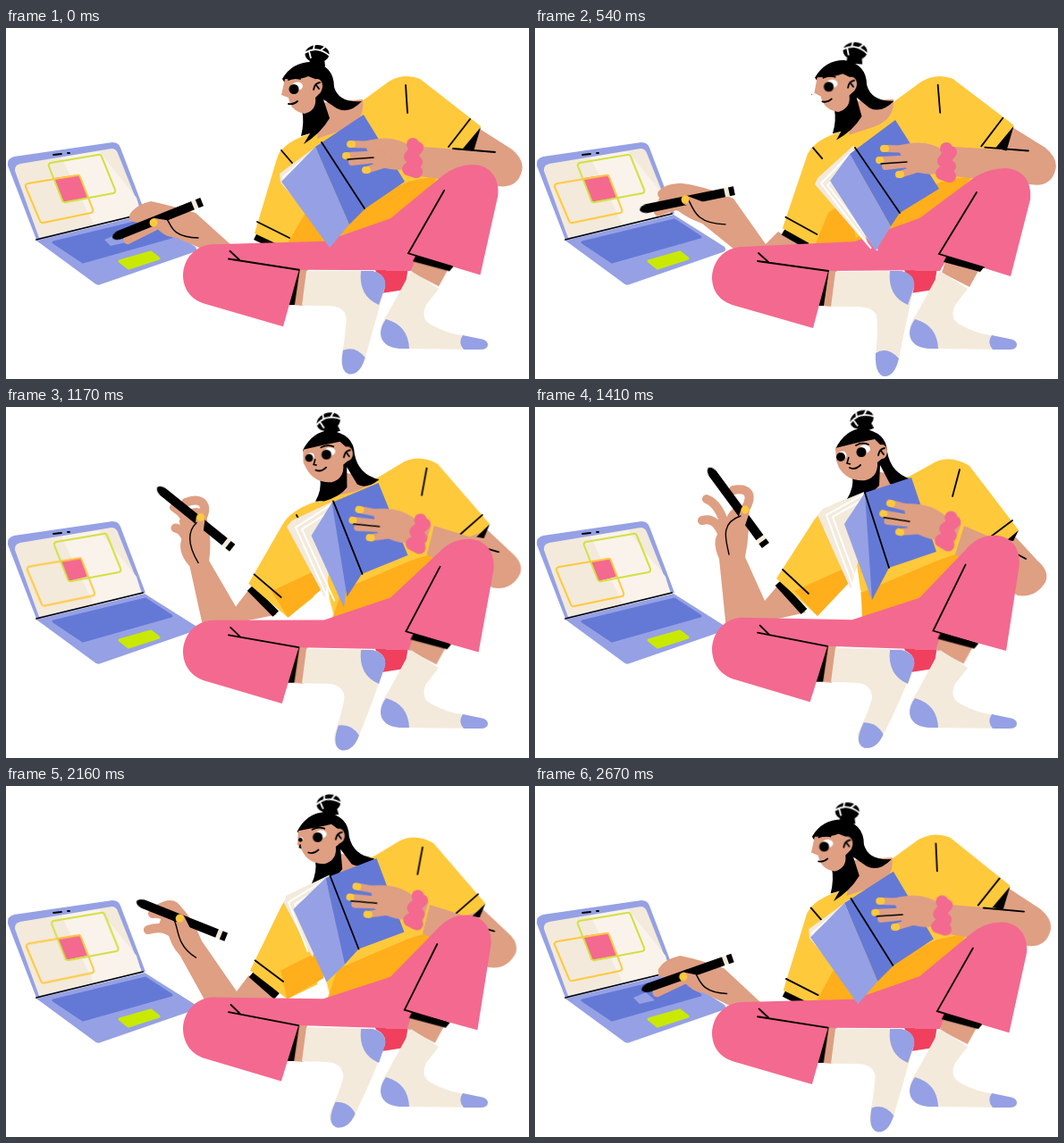
Animation of 585 by 393 pixels, one loop 2700 ms. Source, as an HTML page without scripts:

```html
<!DOCTYPE html>
<html lang="en">
<head>
<meta charset="utf-8">
<title>Sketching at the laptop</title>
<style>
html,body{margin:0;width:100%;height:100%;overflow:hidden;background:#fff}
svg{display:block;width:100%;height:100%}
path{fill:none}
.skin{fill:#de9f83}.yellow{fill:#ffc93c}.amber{fill:#ffae1c}.pink{fill:#f4698f}.red{fill:#f0405e}
.cream{fill:#f3eadb}.glare{fill:#f9f3ec}.lime{fill:#c9e900}.blue{fill:#95a1e4}.deep{fill:#6479d6}.black{fill:#000}
.line{stroke:#000;stroke-width:1.8;stroke-linecap:round}
.thin{stroke-width:1.4}
.finger{stroke:#de9f83;stroke-width:10;stroke-linecap:round;stroke-linejoin:round}
.dots{stroke:#ffc93c;stroke-width:8;stroke-linecap:round}
.leaf{stroke:#fff;stroke-width:2}

/* shared rhythms: legs sway, torso leans, head turns, pose runs key to key */
.sway,.lean,.turn,.late,.pose{animation-duration:2.7s;animation-iteration-count:infinite}
.sway{animation-timing-function:linear(.25,0 20%,.31 34.4%,.83 52.2%,1 70%,.56 90%,.24)}
.lean{animation-timing-function:linear(0,-.05 20%,.5 34.4%,1 52.2%,1.03 70%,.5 90%,0)}
.turn{animation-timing-function:linear(0,.15 20%,.69 34.4%,1 52.2%,.93 70%,.31 90%,0)}
.late{animation-timing-function:linear(0,0 20%,.75 34.4%,1 52.2%,.95 70%,0 90%,0)}
.pose{animation-timing-function:linear}

/* screen */
@keyframes frameA{to{transform:translate(2px,5px)}}
@keyframes frameB{to{transform:translate(7px,0)}}
@keyframes overlap{from{d:path("M54 168L82 164L91 190L63 195Z")}to{d:path("M62 173L84 169L91 190L71 195Z")}}
@keyframes touch{0%,4%,98%,100%{opacity:1}9%,95%{opacity:0}}

/* legs */
@keyframes legs{
from{d:path("M231 245L358 239L430 213L492 167Q508 157 526 157C548 158 556 175 554 192L532 278L452 253L452 271L328 272L311 336L224 311C206 306 198 294 198 279C199 260 212 246 231 245Z")}
to{d:path("M231 234L354 238L430 214L478 160Q492 141 511 141C531 141 541 157 539 175L526 272L444 250L443 272L327 267L307 329L224 304C206 299 198 284 198 269C199 250 212 235 231 234Z")}}
@keyframes creases{
from{d:path("M249 261L328 272M250 252L261 262M494 184L452 253L502 268")}
to{d:path("M249 251L327 267M252 243L262 253M479 175L444 250L490 264")}}
@keyframes sock{
from{d:path("M336 273L410 272Q425 276 424 290Q415 330 407 370Q402 391 390 390Q381 387 381 372Q384 335 382 322Q378 312 360 312L331 312Z")}
to{d:path("M336 269L410 271Q426 276 424 289Q405 335 386 366Q378 382 364 380Q355 377 357 364Q372 340 376 326Q376 309 358 308L331 307Z")}}
@keyframes toe{
from{d:path("M381 364Q394 356 407 370Q402 391 390 390Q380 387 381 364Z")}
to{d:path("M365 351Q381 353 386 366Q378 382 364 380Q351 375 365 351Z")}}
@keyframes ankleL{to{transform:translate(-1px,-4px)}}
@keyframes ankleR{to{transform:translate(-8px,-3px)}}

/* torso */
@keyframes nudge{0%,52.2%,100%{transform:none}20%,34.4%{transform:translate(5px,0)}70%{transform:translate(-3px,0)}90%{transform:translate(-2px,0)}}
@keyframes shirt{
from{d:path("M340 118L398 82L428 60Q445 50 463 57L531 110L519 134L494 180L440 226L365 246L345 244Z")}
to{d:path("M350 103L420 77L447 62Q465 53 486 66L541 138L530 150L494 178L440 226L368 244L364 205Z")}}
@keyframes hem{from{d:path("M345 244L400 195L450 172L484 165L440 226L365 246Z")}to{d:path("M366 240L365 208L450 172L484 160L440 226L368 244Z")}}
@keyframes seams{from{d:path("M447 64L449 95M519 102L495 133")}to{d:path("M475 70L467 100M534 127L510 145")}}
@keyframes forearm{
from{d:path("M530 113L566 136Q580 148 577 160Q572 180 550 177L463 166L465 133L520 137Z")}
to{d:path("M538 146L562 172Q576 184 571 196Q560 214 540 211L470 165L480 133L515 148Z")}}
@keyframes cuffR{from{d:path("M531 111L523 138L511 135Z")}to{d:path("M541 138L535 150L528 149Z")}}
@keyframes elbow{from{d:path("M500 135L547 139")}to{d:path("M536 163L549 170")}}
@keyframes sleeve{
from{d:path("M304 143Q312 126 345 117L370 160L362 195L361 246L312 246L278 230Z")}
to{d:path("M310 130Q320 112 350 103L375 150L352 195L340 208L316 234L270 192Z")}}
@keyframes fold{from{d:path("M350 195L335 207L312 246L361 246Z")}to{d:path("M352 178L290 206L316 234L352 196Z")}}
@keyframes cuffL{from{d:path("M279 233L306 246")}to{d:path("M272 197L301 229")}}
@keyframes stitch{from{d:path("M281 217L317 235M308 137L320 151")}to{d:path("M277 182L306 209M328 118L328 119")}}

/* head */
@keyframes neck{from{d:path("M350 84L399 80Q402 104 380 113L348 124Z")}to{d:path("M372 70L412 78Q405 90 385 93L370 96Z")}}
@keyframes hair{
from{d:path("M309 57Q320 38 342 38Q367 42 367 66Q372 84 398 82Q384 97 370 90L355 80L362 101Q352 118 333 130L340 118L330 121Q334 105 331 92Z")}
to{d:path("M336 47Q347 25 366 24Q393 28 394 50Q398 74 421 81Q406 92 397 86L386 65L385 88Q378 97 360 101L356 103L349 103Q357 90 355 78Z")}}
@keyframes face{
from{d:path("M312 57L308 75L316 78Q318 93 334 96Q348 92 346 78L352 72Q356 62 348 58L338 54Q330 58 312 57Z")}
to{d:path("M336 46L337 60L340 68Q350 84 370 82Q384 78 383 62L388 58Q394 50 388 44L380 36Q358 40 336 46Z")}}
@keyframes follow{to{transform:translate(40px,-15px)}}
@keyframes eye{to{transform:translate(43px,-18px)}}
@keyframes farEye{from{transform:translate(318px,64px) scale(0)}to{transform:translate(342px,56px)}}
@keyframes nose{from{d:path("M310 74L310 74L310 74")}to{d:path("M351 56L349 63L353 64")}}
@keyframes mouth{from{d:path("M316 85Q322 86 326 82")}to{d:path("M352 68Q358 71 364 65")}}
@keyframes brow{from{d:path("M316 58Q322 55 329 57")}to{d:path("M359 43Q366 39 373 42")}}
@keyframes bun{
0%,100%{transform:translate(348px,30px)}
20%{transform:translate(358px,27px) rotate(4deg)}
34.4%{transform:translate(356px,20px) rotate(-18deg)}
52.2%{transform:translate(366px,15px) rotate(-22deg)}
70%{transform:translate(362px,17px) rotate(-20deg)}
90%{transform:translate(360px,24px)}}

/* book */
@keyframes pages{
0%,100%{d:path("M307 173L306 163L353 128L348 160L330 200Z")}
20%{d:path("M313 175L316 168L357 131L355 190L374 246Z")}
34.4%{d:path("M312 147L318 140L362 117L360 190L361 224Z")}
52.2%{d:path("M316 121L322 114L368 95L365 160L353 204Z")}
70%{d:path("M315 113L320 108L368 91L360 150L356 204Z")}
90%{d:path("M306 147L308 137L356 108L350 140L330 180Z")}}
@keyframes leaf{
0%,100%{d:path("M330 195L310 167L352 131")}
20%{d:path("M376 247L320 174L356 137")}
34.4%{d:path("M364 226L322 149L360 121")}
52.2%{d:path("M357 205L326 121L367 98")}
70%{d:path("M356 202L323 117L366 93")}
90%{d:path("M320 170L309 143L355 112")}}
@keyframes cover{
0%,100%{d:path("M346 133L400 97L446 172L402 202L384 220Z")}
20%{d:path("M352 141L403 103L452 180L408 207L398 222Z")}
34.4%{d:path("M360 118L412 91L450 170L400 194L386 209Z")}
52.2%{d:path("M369 96L421 79L449 162L396 180L377 216Z")}
70%{d:path("M367 91L421 76L446 162L394 175L380 191Z")}
90%{d:path("M348 115L408 86L445 165L395 190L378 208Z")}}
@keyframes back{
0%,100%{d:path("M308 172L346 133L384 220L362 246Z")}
20%{d:path("M330 171L352 141L398 222L381 250Z")}
34.4%{d:path("M337 157L360 118L386 209L379 233Z")}
52.2%{d:path("M346 131L369 96L379 170L377 216Z")}
70%{d:path("M334 128L367 91L381 191L363 210Z")}
90%{d:path("M309 148L348 115L378 208L354 229Z")}}
@keyframes spine{
0%,100%{d:path("M353 128L401 202")}20%{d:path("M358 134L408 207")}34.4%{d:path("M363 115L401 194")}
52.2%{d:path("M369 96L396 180")}70%{d:path("M368 91L394 175")}90%{d:path("M357 110L395 190")}}
@keyframes hold{
0%,100%{transform:none}
20%{transform:translate(5px,5px)}
34.4%{transform:translate(7px,-8px) rotate(6deg)}
52.2%{transform:translate(12px,-22px) rotate(13deg)}
70%{transform:translate(10px,-24px) rotate(13deg)}
90%{transform:translate(3px,-11px) rotate(5deg)}}

/* drawing arm */
@keyframes arm{
0%,100%{d:path("M138 216Q140 199 162 194Q185 199 212 207L253 244L262 244L262 250L226 250L188 234Q180 236 166 222Z")}
20%{d:path("M136 200Q140 177 162 174Q186 176 222 191L258 242L272 228L300 245L228 252L187 219Q172 214 160 205Z")}
34.4%{d:path("M177 120Q190 110 205 118Q222 150 219 176L257 230L273 207L303 235L228 248L205 187Q182 172 190 148Z")}
52.2%{d:path("M210 135Q218 105 238 112Q241 140 235 168L257 217L273 198L303 230L214 250L206 170Q197 150 206 140Z")}
70%{d:path("M204 135Q205 110 222 108Q235 140 230 165L257 220L273 202L303 232L230 250L206 172Q196 155 204 140Z")}
90%{d:path("M136 185Q145 160 165 157Q184 158 208 182L259 240L270 222L300 242L226 250L183 207Q172 202 158 186Z")}}
@keyframes index{
0%,100%{d:path("M143 211C148 203 160 197 175 203")}
20%{d:path("M142 186C150 178 160 178 172 181")}
34.4%{d:path("M180 121C200 108 214 122 203 137")}
52.2%{d:path("M222 93C248 88 242 112 225 125")}
70%{d:path("M202 101C228 93 228 112 210 130")}
90%{d:path("M141 173C148 162 160 161 172 163")}}
@keyframes fingers{
0%,100%{d:path("M136 237Q150 230 166 222M150 212Q160 206 170 210")}
20%{d:path("M138 206Q152 200 170 196M150 190Q160 186 170 190")}
34.4%{d:path("M192 144Q194 152 198 162M184 122Q195 130 200 145")}
52.2%{d:path("M187 127Q204 122 211 148M192 103Q207 109 213 135")}
70%{d:path("M177 138Q196 131 205 155M178 114Q196 116 208 140")}
90%{d:path("M141 184Q155 180 170 176M150 172Q160 166 170 170")}}
@keyframes thumb{
0%,100%{d:path("M166 218L190 222")}20%{d:path("M169 193L193 202")}34.4%{d:path("M200 133L203 160")}
52.2%{d:path("M235 117L224 150")}70%{d:path("M217 120L217 150")}90%{d:path("M173 177L195 190")}}
@keyframes nail{
0%,100%{transform:translate(165px,218px)}20%{transform:translate(168px,192px)}34.4%{transform:translate(200px,132px)}
52.2%{transform:translate(235px,115px)}70%{transform:translate(217px,119px)}90%{transform:translate(172px,177px)}}
@keyframes palm{
0%,100%{d:path("M169 211C190 206 172 234 215 235")}
20%{d:path("M172 193C178 206 182 219 213 220")}
34.4%{d:path("M196 137C193 155 200 172 213 184")}
52.2%{d:path("M230 122C206 130 214 150 217 165")}
70%{d:path("M212 125C204 140 203 155 214 172")}
90%{d:path("M160 170C184 165 172 200 211 212")}}
@keyframes pen{
0%,100%{transform:translate(119px,235px) rotate(-22deg)}
20%{transform:translate(117px,204px) rotate(-11.7deg)}
34.4%{transform:translate(144px,112px) rotate(24deg)}
52.2%{transform:translate(194px,68px) rotate(53.7deg)}
70%{transform:translate(171px,83px) rotate(42deg)}
90%{transform:translate(121px,175px) rotate(1.6deg)}}
</style>
</head>
<body>
<svg viewBox="0 0 585 393">
<defs>
  <clipPath id="faceClip"><path class="turn" style="animation-name:face"/></clipPath>
</defs>

<g id="laptop">
  <path class="blue" d="M9 144L119 128Q126 128 128 134L156 208L34 237L2 154Q1 146 9 144Z"/>
  <path class="cream" d="M16 152L118 135Q123 135 125 140L152 208L37 235L10 160Q9 154 16 152Z"/>
  <path class="glare" d="M62 145L104 138L146 190L151 207L98 220Z"/>
  <path class="line" d="M53 142L62 141M69 140h2"/>
  <path class="pink late" style="animation-name:overlap"/>
  <path class="late" style="animation-name:frameA" stroke="#ffc93c" stroke-width="2" stroke-linejoin="round" d="M25 174L79 165Q82 164 83 167L97 203Q98 206 95 207L42 218Q39 219 38 216L22 178Q21 175 25 174Z"/>
  <path class="late" style="animation-name:frameB" stroke="#d3e03f" stroke-width="2" stroke-linejoin="round" d="M50 151L103 142Q106 141 107 144L122 181Q123 184 120 185L67 195Q64 196 63 193L48 155Q47 152 50 151Z"/>
  <path class="blue" d="M34 238L155 209L212 245Q215 249 210 251L106 287Q102 289 98 285Z"/>
  <path class="deep" stroke="#6479d6" stroke-width="3" stroke-linejoin="round" d="M53 240L156 215L185 234L86 262Z"/>
  <path class="lime" stroke="#c9e900" stroke-width="3" stroke-linejoin="round" d="M127 261L162 251L171 258L137 269Z"/>
  <path class="line" d="M34 237L153 208"/>
  <path class="blue pose" style="animation-name:touch" d="M110 237L124 231L134 240L117 244Z"/>
</g>

<g id="drawing-arm">
  <path class="skin pose" style="animation-name:arm"/>
  <path class="finger pose" style="animation-name:fingers"/>
  <path class="finger pose" style="animation-name:index"/>
  <g class="pose" style="animation-name:pen">
    <path class="black" d="M0 0Q1 -4 8 -5L108 -5L108 5L8 5Q1 4 0 0Z"/>
    <path class="cream" d="M97 -5H102V5H97Z"/>
  </g>
  <path class="finger pose" style="animation-name:thumb"/>
  <path class="line thin pose" style="animation-name:palm"/>
  <circle class="yellow pose" style="animation-name:nail" r="4.5"/>
</g>

<g id="torso" class="pose" style="animation-name:nudge">
  <path class="yellow lean" style="animation-name:shirt"/>
  <path class="amber lean" style="animation-name:hem"/>
  <path class="skin lean" style="animation-name:forearm"/>
  <path class="black lean" style="animation-name:cuffR"/>
  <path class="line lean" style="animation-name:seams"/>
  <path class="line lean" style="animation-name:elbow"/>
</g>

<g id="left-sleeve">
  <path class="turn" style="animation-name:cuffL" stroke="#000" stroke-width="9"/>
  <path class="yellow turn" style="animation-name:sleeve"/>
  <path class="amber turn" style="animation-name:fold"/>
  <path class="line turn" style="animation-name:stitch"/>
</g>

<g id="head">
  <path class="skin turn" style="animation-name:neck"/>
  <g class="pose" style="animation-name:bun">
    <ellipse cy="-1" rx="13.5" ry="10"/>
    <path class="black" d="M-8 4L8 4L9 13L-9 13Z"/>
    <path stroke="#fff" stroke-width="1.8" d="M-14 -2Q0 -11 14 1M-4 -6L-3 -12M4 -5L9 -9M-9 -4L-7 4"/>
  </g>
  <path class="black turn" style="animation-name:hair"/>
  <path class="skin turn" style="animation-name:face"/>
  <g class="turn" style="animation-name:follow">
    <ellipse class="skin" cx="348" cy="65" rx="6" ry="8"/>
    <path class="line" d="M344 69Q345 62 351 61M347 64L350 68"/>
  </g>
  <g clip-path="url(#faceClip)">
    <g class="late" style="animation-name:farEye">
      <circle cx="2" cy="-2" r="4.5" fill="#fff"/>
      <circle r="5"/>
    </g>
    <g class="turn" style="animation-name:eye">
      <ellipse cx="326" cy="65" rx="6" ry="4.5" fill="#fff"/>
      <circle cx="322" cy="68.5" r="5.5"/>
    </g>
  </g>
  <path class="line turn" style="animation-name:brow"/>
  <path class="late" style="animation-name:nose" stroke="#000" stroke-width="1.6"/>
  <path class="line turn" style="animation-name:mouth"/>
</g>

<g id="legs">
  <path class="red" d="M413 270L450 268L446 293L420 297Z"/>
  <path class="pink" d="M425 240L462 256L453 272L425 272Z"/>
  <g class="sway" style="animation-name:ankleR">
    <path class="skin" d="M460 258L498 268L486 290L455 274Z"/>
    <path class="black" d="M462 252L503 267L498 273L457 262Z"/>
  </g>
  <path class="cream" d="M453 272L484 292L470 310Q463 325 475 332Q495 343 515 345L532 348Q540 350 539 356Q538 361 530 360L440 359Q420 357 419 342Q419 330 428 318Z"/>
  <path class="blue" d="M425 326Q450 333 451 359L440 359Q420 357 419 342Q419 334 425 326ZM511 344Q505 352 512 360L530 360Q539 360 539 354Q538 349 530 348Z"/>
  <g class="sway" style="animation-name:ankleL">
    <path class="skin" d="M326 268L338 268L333 312L321 311Z"/>
    <path class="black" d="M320 268L329 270L323 311L314 311Z"/>
  </g>
  <path class="cream sway" style="animation-name:sock"/>
  <path class="blue sway" style="animation-name:toe"/>
  <path class="blue" d="M397 272L410 272Q426 276 424 290L417 310Q394 300 397 272Z"/>
  <path class="pink sway" style="animation-name:legs"/>
  <path class="line sway" style="animation-name:creases"/>
</g>

<g id="book">
  <path class="cream pose" style="animation-name:pages"/>
  <path class="leaf pose" style="animation-name:leaf"/>
  <path class="leaf pose" style="animation-name:leaf" transform="translate(7 2)"/>
  <path class="blue pose" style="animation-name:back"/>
  <path class="deep pose" style="animation-name:cover"/>
  <path class="line pose" style="animation-name:spine"/>
</g>

<g id="holding-hand" class="pose" style="animation-name:hold;transform-origin:386px 130px">
  <path class="skin" d="M400 127Q432 118 452 132L468 134L464 165L447 158Q430 161 410 152Z"/>
  <path class="finger" style="stroke-width:8" d="M387 130L420 131M382 143L420 141M387 150L420 146M406 158L432 150"/>
  <path class="dots" d="M385 130h2M380 143h1M402 159h2"/>
  <path class="line thin" d="M382 147L411 145"/>
  <path stroke="#f4698f" stroke-width="14" stroke-linecap="round" stroke-linejoin="round" d="M455 130h.1M460 134L452 144L459 150L450 158L459 161"/>
</g>
</svg>
</body>
</html>
```
